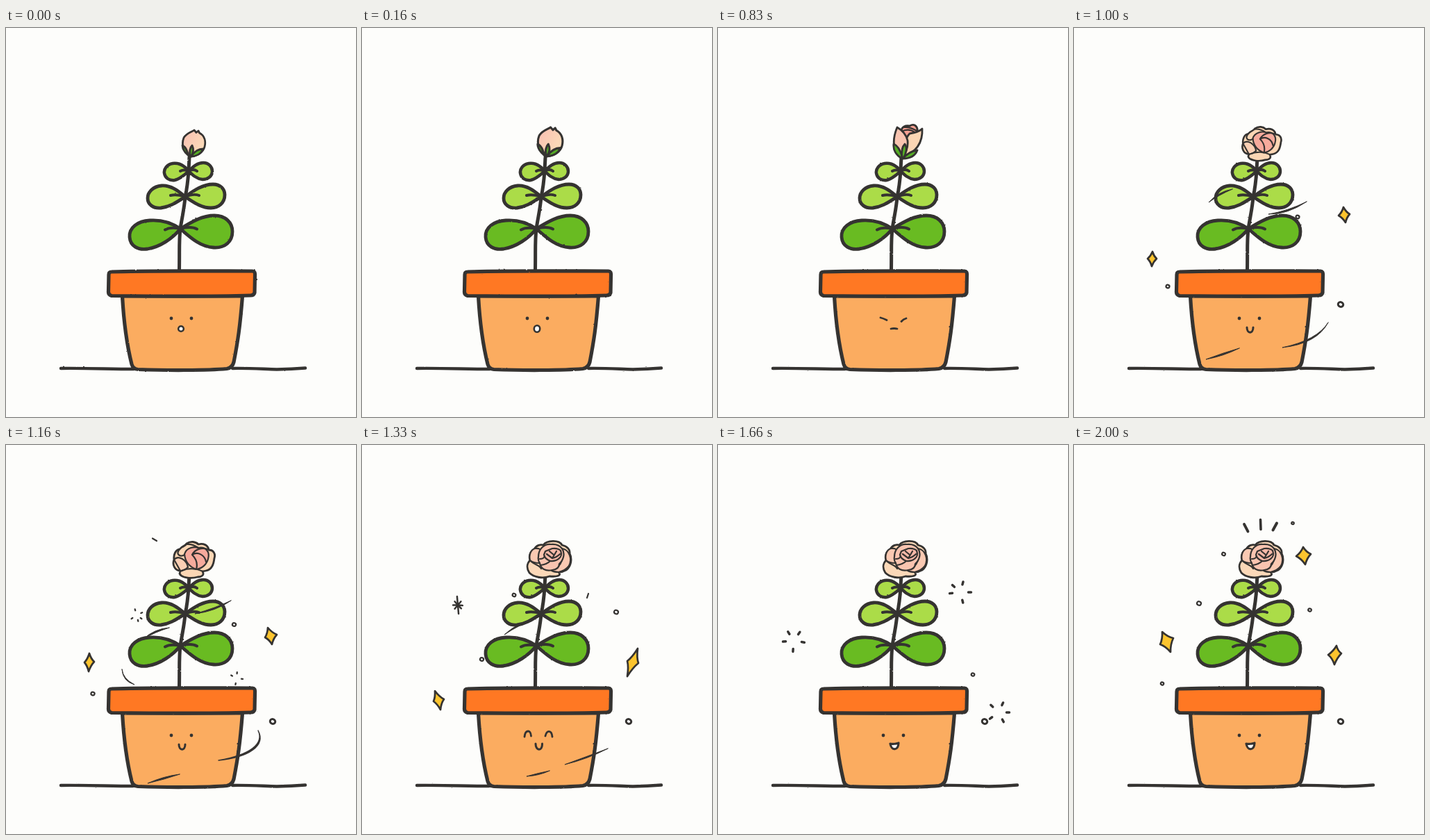
Animation, 504 px wide and 560 px high, one loop 3000 ms. Source, as an HTML page:

```html
<!DOCTYPE html>
<html lang="en">
<head>
<meta charset="utf-8">
<title>Blooming pot</title>
<style>
  html, body { margin: 0; width: 100%; height: 100%; overflow: hidden; background: #fdfdfb; }
  svg { display: block; width: 100vw; height: 100vh; }
  .ink { stroke: #353331; stroke-linecap: round; stroke-linejoin: round; }
</style>
</head>
<body>
<svg viewBox="0 0 504 560">
  <defs>
    <filter id="crayon" filterUnits="userSpaceOnUse" x="60" y="130" width="390" height="380" color-interpolation-filters="sRGB">
      <feTurbulence id="grain" type="fractalNoise" baseFrequency="0.28" numOctaves="1" seed="1"/>
      <feDisplacementMap in="SourceGraphic" scale="2" xChannelSelector="R" yChannelSelector="G"/>
    </filter>
    <linearGradient id="blush" x1="0" y1="0" x2="1" y2="0.7">
      <stop offset="0.1" stop-color="#f9c1b2"/>
      <stop offset="0.9" stop-color="#fbdab8"/>
    </linearGradient>
    <radialGradient id="cup" cx="0.5" cy="0.4" r="0.6">
      <stop offset="0" stop-color="#f8bdb2"/>
      <stop offset="1" stop-color="#fad6c0"/>
    </radialGradient>
  </defs>
  <g id="plant" class="ink" filter="url(#crayon)"></g>
  <g id="bud" class="ink" stroke-width="2.8"></g>
  <g id="face" class="ink" fill="none" stroke-width="2.8"></g>
  <g id="sparks" class="ink"></g>
</svg>
<script>
const INK = '#353331', LEAF = '#69bb22', LIGHT = '#abdc48', SEPAL = '#55ad25',
      PINK = '#f9c4b0', CREAM = '#fbd6b4', ROSE = '#f6aa9c';
const el = id => document.getElementById(id);

const path = (d, fill = 'none', width) =>
  `<path d="${d}" fill="${fill}"${width ? ` stroke-width="${width}"` : ''}/>`;
const scaled = (k, art) =>
  `<g transform="translate(265 188) scale(${k}) translate(-265 -188)">${art}</g>`;

// Plant and pot
el('plant').innerHTML = [
  path('M79 490C115 489.5 150 491 184 491M326 490C350 489.500 370 491 390 491.500Q412 491 431 489.500', 'none', 4.4),
  path('M167.500 386C170 430 175 460 181 484Q183 491 190 491.500C230 493 290 493 318 490.500Q326 489 328 481C334 450 337 430 340.500 386Z', '#fbac60', 5.2),
  path('M152 351C200 349.500 300 350 355 350Q359 350 358.500 356L358 381Q357 385 352 385C300 386.500 200 386 152 385.500Q147 384 147.500 379L148 355Q148 351 152 351Z', '#ff7823', 5.2),
  path('M249.500 348C250 320 249 305 251 289C254 270 257 258 258 243C261 230 262 220 263 205L264 186', 'none', 5),
  path('M251 289C238 280 222 276 207 277C190 278 177 287 178 301C179 314 190 320 204 318C222 315 240 303 251 289Z', LEAF, 4.8),
  path('M251 289C266 280 282 270 300 270C316 270 326 280 326 293C326 308 315 317 299 316C280 315 266 302 251 289Z', LEAF, 4.8),
  path('M258 243C248 234 237 226 224 227C212 228 204 236 204 245C204 254 212 260 223 259C238 257 248 249 258 243Z', LIGHT, 4.8),
  path('M258 243C268 236 282 225 298 225C309 225 315 232 315 240C315 252 306 259 295 259C280 259 268 249 258 243Z', LIGHT, 4.8),
  path('M263 206C256 197 248 194 240 195C232 196 227 203 228 209C229 216 235 220 243 219C252 217 257 211 263 206Z', LIGHT, 4.5),
  path('M263 206C270 199 276 194 284 194C292 194 297 200 297 206C297 214 290 218 283 218C274 217 268 211 263 206Z', LIGHT, 4.5),
  path('M229 290.500Q237 286 251 289Q267 285 275 289.500M237 241Q246 239 258 243Q270 238 278 241M251 206Q256 203 263 206Q270 202 275 206', 'none', 4)
].join('');

// Flower stages
const sepals =
  path('M265 188C256 183 252 175 253 167C259 169 263 178 265 184Z', SEPAL) +
  path('M266 188C272 181 279 177 287 176C284 184 276 188 266 188Z', SEPAL) +
  path('M265 187C264 179 265 171 269 167C273 172 271 181 267 187Z', SEPAL);

const closed =
  path('M264 184C256 178 252 168 256 158C260 151 267 150 271 147L274 150.500L277 148L278.500 151C286 155 288 163 286 171C284 179 276 184 266 185Z', 'url(#blush)') +
  path('M263 184C257 179 254 175 254 169C259 171 261 177 263 184Z', SEPAL) +
  path('M266 185C271 178 277 174 284 174C281 181 274 185 266 185Z', SEPAL) +
  path('M265 185C264 178 265 172 268 169C271 175 269 181 266 185Z', SEPAL);

const tulip =
  path('M265 188C254 181 250 168 252 157C254 149 258 148 262 143C266 143 268 146 271 147L275 144C278 144 280 149 284 149C288 151 291 150 294 149C296 160 292 172 283 180Q276 186 265 188Z', 'url(#cup)') + sepals;

const opening =
  path('M262 170L264 149C264 142 270 140 276 141C282 137 288 141 287 149L284 170Z', '#f5a092') +
  path('M264 149C272 145 279 147 283 150M268 143Q276 142 286 148', 'none', 2.2) +
  path('M265 187C268 175 268 160 276 152C283 151 290 149 294 145C295 162 288 178 265 187Z', CREAM) +
  path('M265 187C252 178 250 162 258 143C265 147 271 153 273 162C274 172 270 181 265 187Z', PINK) + sepals;

const unfolded =
  path('M250 150C254 145 258 146 260 142C266 138 273 139 277 143C284 141 291 144 292 151C299 151 302 157 300 163C299 171 297 179 288 181L283 182C286 187 282 190 276 190C266 193 252 191 250 185L251 181C243 181 239 172 242 165C241 158 244 151 250 150Z', CREAM) +
  path('M242 165C248 158 260 165 262 176Q257 181 251 181Z', '#fbcfb4', 2.2) +
  path('M257 157C260 147 272 146 277 148C288 146 294 154 291 164C289 172 282 178 274 179C266 176 258 170 257 157Z', ROSE, 2.2) +
  path('M250 150C244 157 250 162 257 158M251 182C262 176 275 178 284 182M268 158C272 150 282 147 290 150M268 158C274 164 276 172 274 179M268 158C276 153 286 158 288 168M260 143Q268 142 277 148', 'none', 2.2);

const bloom =
  path('M248 150C251 144 257 143 261 144C266 137 284 136 288 144C296 146 300 151 299 156C303 164 301 175 294 180Q289 183 283 183C288 188 281 190 270 189C260 193 247 190 241 184C237 178 237 171 242 166C240 160 242 153 248 150Z', '#fbd8b8') +
  path('M242 166C240 158 243 151 249 149Q256 148 259 152L255 170Q247 170 242 166Z', '#fac9b2', 2.2) +
  path('M288 149C299 151 303 164 298 174Q293 181 283 183Q276 183 272 180Q284 178 288 166Z', '#fac9b2', 2.2) +
  path('M254 161C254 150 262 142 272 143Q283 142 288 149C293 156 290 166 284 171Q284 179 274 180C264 182 257 178 256 170Q253 166 254 161Z', PINK, 2.2) +
  path('M264 153L274 149Q282 148 286 152Q289 160 283 164Q278 168 271 167Q263 164 262 158Z', '#f8b9a8', 2.2) +
  path('M266 157L274 163L280 153M274 163Q280 162 285 157M270 153L276 158M256 164Q262 164 263 160M257 173Q266 172 271 167M242 166C246 172 254 171 258 178', 'none', 2.2);

// Faces
const oval = (x, y, rx, ry, tilt = 0, fill = '#fff', width = 2.6) =>
  `<ellipse cx="${x}" cy="${y}" rx="${rx}" ry="${ry}" fill="${fill}" stroke-width="${width}" transform="rotate(${tilt} ${x} ${y})"/>`;
const eyes = [238, 267].map(x => oval(x, 418, 1.4, 1.4, 0, INK, 2)).join('');
const gasp = (rx, ry, tilt) => eyes + oval(252, 433, rx, ry, tilt);
const strain = path('M234 417Q238 418 243 420.500M264 422.500Q267 419 271 418M249 433Q253 432 258 433');
const smile = eyes + path('M249 431C249 440.500 258 440.500 258 431', 'none', 3);
const glad = path('M234 420C235 410 243 409 243.500 419M264 419C266 410 273 410 274 420') +
  path('M250 430C250 441 260 441 259.500 430', 'none', 3);
const laugh = eyes + path('M248 430Q254 431 260 429C259.500 440 250 441 248 430Z', '#fff', 3.2);

// Sparkles
const star = (...p) => {
  const cx = (p[0] + p[2] + p[4] + p[6]) / 4, cy = (p[1] + p[3] + p[5] + p[7]) / 4;
  const mid = (a, b, c) => (a + b) * 0.36 + c * 0.28;
  let d = `M${p[0]} ${p[1]}`;
  for (let i = 0; i < 8; i += 2) {
    const j = (i + 2) % 8;
    d += `Q${mid(p[i], p[j], cx)} ${mid(p[i + 1], p[j + 1], cy)} ${p[j]} ${p[j + 1]}`;
  }
  return path(d + 'Z', '#fcc42e', 2.7);
};
const bubble = (x, y, r) => oval(x, y, r, r * 0.9, 20, '#fff', 2.2);
const drop = oval(384, 398, 3.8, 3.3, 20, '#fff', 3);
const tick = (x1, y1, x2, y2, w = 2.5) => path(`M${x1} ${y1}L${x2} ${y2}`, 'none', w);
const swoosh = (x1, y1, cx, cy, x2, y2, w = 2.5) =>
  path(`M${x1} ${y1}Q${cx} ${cy - w} ${x2} ${y2}Q${cx} ${cy + w} ${x1} ${y1}Z`, INK, 1);
const rays = (x, y, from, to, angles, w) => angles.map(a => {
  const c = Math.cos(a * Math.PI / 180), s = Math.sin(a * Math.PI / 180);
  return tick(x + c * from, y + s * from, x + c * to, y + s * to, w);
}).join('');
const burst = (x, y, angles) => rays(x, y, 11.5, 15.5, angles, 3.5);
const puff = (x, y, angles) => rays(x, y, 7, 9, angles, 2.3);
const aster = (x, y, r) => rays(x, y, 0, r, [-95, 85], 2.5) +
  rays(x, y, 0, r * 0.55, [-50, 5, 45, 130, 180, 230], 2.5);

const swirl = drop +
  star(113, 322, 119, 332, 112, 343, 106, 332) +
  star(388, 258, 397, 268, 391, 280, 381, 270) +
  bubble(135, 372, 2.5) + bubble(322, 272, 2.5) +
  swoosh(335, 250, 308, 266, 280, 268) + swoosh(228, 232, 208, 238, 194, 251) +
  swoosh(366, 424, 350, 452, 300, 460) + swoosh(238, 461, 215, 470, 190, 477);

const spin = drop +
  star(120, 300, 127, 312, 119, 326, 113, 313) +
  star(377, 263, 390, 273, 383, 287, 373, 277) +
  bubble(125, 358, 2.6) + bubble(328.5, 258.5, 2.6) +
  tick(211, 134.5, 217, 138, 2.2) +
  swoosh(324, 224, 302, 237, 272, 243) + swoosh(235, 263, 214, 267, 198, 279) +
  swoosh(167, 323, 168, 338, 185, 345, 2) +
  path('M363 411C372 430 352 446 306 454C349 450 375 433 363 411Z', INK, 1.4) +
  swoosh(250, 474, 228, 479, 204, 487) +
  puff(188, 245, [-105, -25, 75, 145, 35]) + puff(332, 336, [-85, -150, 5, 100]);

const whirl = drop +
  star(397, 293, 398, 314, 382, 333, 382, 311) +
  star(105, 354, 118, 366, 113, 381, 103, 369) +
  aster(138, 230.5, 12.5) +
  bubble(219, 216, 2.4) + bubble(366, 240.5, 3) + bubble(172.5, 308.5, 2.6) +
  tick(326, 214, 324, 220, 2.2) +
  swoosh(258, 246, 225, 257, 205, 273) +
  swoosh(354, 437, 325, 450, 292, 460, 2) + swoosh(270, 469, 255, 474, 237, 477, 2);

const settle = drop +
  aster(102, 282, 12) + aster(349, 212, 12) + aster(407, 380, 12) +
  bubble(367, 322, 2.5) + tick(300, 116, 297, 122, 2.2) +
  swoosh(318, 486, 340, 494, 352, 505, 2);

const fade = drop + bubble(367, 330.5, 2.3) +
  burst(109, 282, [-122, -55, 176, 8, 94]) +
  burst(349, 212, [-138, -75, 0, 76, 174]) +
  burst(404, 385, [-136, -65, 0, 62, 144]);

const shine = drop +
  star(330, 147, 341, 157, 333, 172, 320, 160) +
  star(127, 269, 143, 278, 139, 298, 124, 287) +
  star(378, 289, 385, 300, 375, 316, 366, 302) +
  tick(245, 114, 250.5, 124.5, 3.8) + tick(268.5, 107.5, 269, 121.5, 3.6) + tick(292, 112.5, 286.5, 122.5, 4) +
  bubble(315, 112.5, 1.8) + bubble(215.5, 157, 2.4) + bubble(180, 228, 3) +
  bubble(339.5, 237.5, 2.3) + bubble(127, 343.5, 2.2);

// start, seed, flower, face, sparkles
const poses = [
  [0, 1, closed, gasp(3.8, 3.8, 0), ''],
  [160, 2, scaled(1.1, closed), gasp(4.2, 4.8, 4), ''],
  [330, 3, tulip, gasp(5, 7.5, 8), ''],
  [500, 3, tulip, gasp(6, 10.5, 8), ''],
  [660, 4, scaled(0.96, opening), strain, ''],
  [830, 5, opening, strain, ''],
  [1000, 5, scaled(0.94, unfolded), smile, swirl],
  [1160, 5, unfolded, smile, spin],
  [1330, 5, bloom, glad, whirl],
  [1500, 5, bloom, glad, settle],
  [1660, 5, bloom, laugh, fade],
  [1830, 5, bloom, laugh, shine]
];

let shown = -1;
function draw(now) {
  const t = now % 3000;
  const i = poses.findLastIndex(p => t >= p[0]);
  if (i === shown) return;
  shown = i;
  const [, seed, flower, face, sparks] = poses[i];
  el('grain').setAttribute('seed', seed);
  el('bud').innerHTML = flower;
  el('face').innerHTML = face;
  el('sparks').innerHTML = sparks;
}

const start = performance.now();
function loop() {
  draw(performance.now() - start);
  requestAnimationFrame(loop);
}
loop();
</script>
</body>
</html>
```
